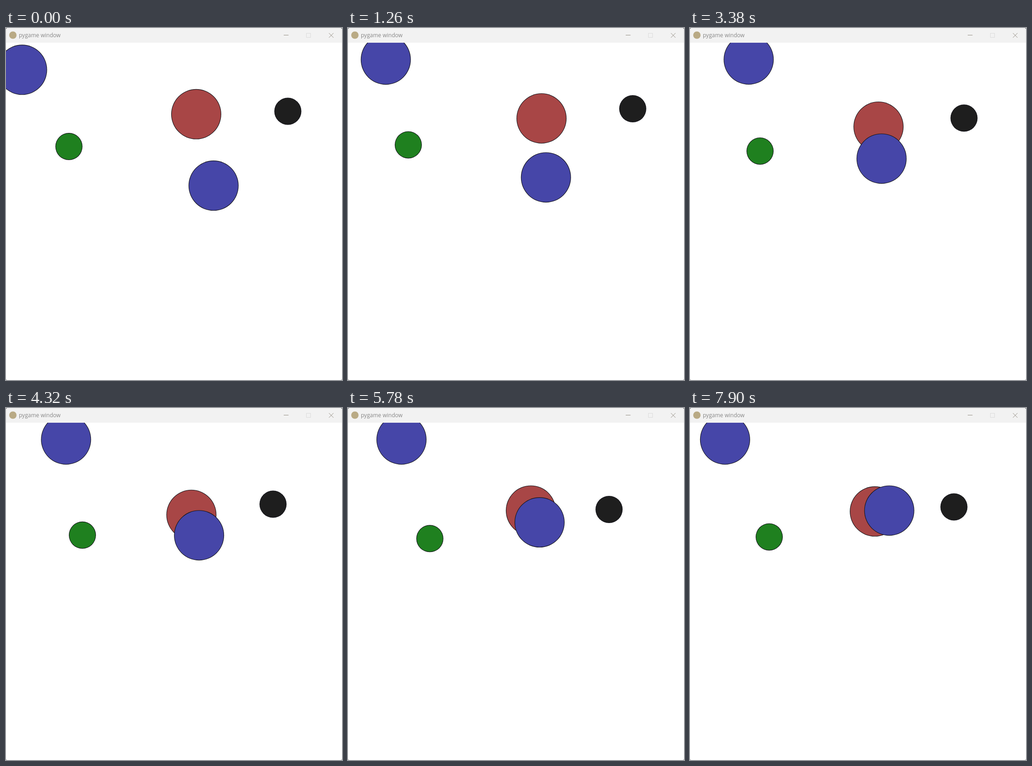
Recreate the animation shown at these times as an HTML page with a canvas. Size 732 by 765 pixels, loop 8000 ms.

```html
<!DOCTYPE html>
<html lang="en">
<head>
<meta charset="utf-8">
<title>pygame window</title>
<style>
  html, body { margin: 0; width: 100%; height: 100%; overflow: hidden; background: #fff; }
  canvas { display: block; }
</style>
</head>
<body>
<canvas id="stage" width="732" height="765"></canvas>
<script>
const ctx = document.getElementById('stage').getContext('2d');
const W = 732, H = 765, BAR = 32, LOOP = 8000;
const BIG = 54.5, SMALL = 29.5;
const BLUE = '#4646a8', RED = '#a84646', GREEN = '#1f801f', BLACK = '#1e1e1e';

// Key points are [seconds, value, ...]; a smooth curve runs through them.
const squeeze = curve([0, 0], [0.5, -11], [1.26, -6.3], [1.86, -9], [2.46, 0.9],
  [4.32, 32.5], [5.5, 44.5], [5.78, 45.2], [6.97, 39], [7.9, 39]);
const drift = curve([0, 35], [0.67, 54], [1.26, 82.4], [1.86, 92.5], [2.46, 106.5],
  [3.71, 133.5], [4.32, 130.8], [4.91, 135], [5.78, 116], [6.97, 83.4], [7.9, 76.2]);
const redPath = curve([0, 414.4, 187.3], [1.26, 421.6, 196.5], [2.46, 417.4, 195.6],
  [4.32, 403.8, 232.4], [5.78, 398.4, 222.8], [6.97, 401.7, 217.5], [7.9, 402.7, 225]);
const bluePath = curve([0, 452.2, 342.6], [1.26, 431.2, 324.6], [2.46, 415.4, 292.4],
  [4.32, 420.6, 276.5], [5.18, 413, 256.5], [5.78, 417.5, 248.2], [6.97, 422.7, 227.2],
  [7.9, 434.4, 222.8]);

function curve(...keys) {
  const slope = (i, axis) => {
    const a = keys[Math.max(0, i - 1)], b = keys[Math.min(keys.length - 1, i + 1)];
    return (b[axis] - a[axis]) / (b[0] - a[0]);
  };
  return t => {
    const i = Math.max(1, keys.findIndex(key => key[0] >= t));
    const a = keys[i - 1], b = keys[i], span = b[0] - a[0];
    const u = (t - a[0]) / span, ease = u * u * (3 - 2 * u);
    return a.slice(1).map((from, n) => {
      const axis = n + 1;
      return from + (b[axis] - from) * ease
        + span * u * (1 - u) * ((1 - u) * slope(i - 1, axis) - u * slope(i, axis));
    });
  };
}

// The window repaints about every 300 ms, snapped to a 15 Hz clock.
function lastRepaint(ms) {
  let shown = 0;
  for (let n = 0; n <= 26; n++) {
    const tick = 66.2 * Math.floor(4.53 * n + 1.71);
    if (tick <= ms) shown = tick;
  }
  return Math.min(shown / 1000, 7.9);
}

function ball(x, y, r, color) {
  for (const [radius, fill] of [[r, '#14141a'], [r - 1.1, color]]) {
    ctx.fillStyle = fill;
    ctx.beginPath();
    ctx.arc(x, y, radius, 0, 2 * Math.PI);
    ctx.fill();
  }
}

function drawBalls(t) {
  const [s] = squeeze(t);
  ball(drift(t)[0], 68.5 + 22.3 * Math.exp(-4 * t), BIG, BLUE);
  ball(...redPath(t), BIG, RED);
  ball(...bluePath(t), BIG, BLUE);
  // Both small balls share one swing.
  ball(137.1 + 0.91 * s, 257.6 + 0.58 * s, SMALL, GREEN);
  ball(614 - s, 181 + 0.87 * s, SMALL, BLACK);
}

function strokeLines(color, ...lines) {
  ctx.strokeStyle = color;
  ctx.lineWidth = 1;
  ctx.beginPath();
  for (const [x1, y1, x2, y2] of lines) {
    ctx.moveTo(x1, y1);
    ctx.lineTo(x2, y2);
  }
  ctx.stroke();
}

function drawTitleBar() {
  ctx.fillStyle = '#f2f2f2';
  ctx.fillRect(0, 0, W, BAR);
  ctx.fillStyle = '#b9aa85';
  ctx.beginPath();
  ctx.arc(15, 15.5, 8, 0, 2 * Math.PI);
  ctx.fill();
  ctx.fillStyle = '#878787';
  ctx.font = '12px "Open Sans", sans-serif';
  ctx.fillText('pygame window', 28, 20);
  strokeLines('#958f84', [605, 15.5, 615.5, 15.5],
    [703.5, 11, 713.5, 21], [713.5, 11, 703.5, 21]);
  ctx.strokeStyle = '#dcdcdc';
  ctx.strokeRect(654.5, 11.5, 9, 9);
}

function draw(ms) {
  ctx.fillStyle = '#555';
  ctx.fillRect(0, 0, W, H);
  ctx.save();
  ctx.beginPath();
  ctx.roundRect(0, 0, W, H, [4, 4, 2, 2]);
  ctx.clip();
  ctx.fillStyle = '#fff';
  ctx.fillRect(0, 0, W, H);
  drawBalls(lastRepaint(ms));
  drawTitleBar();
  ctx.restore();
}

const start = performance.now();
function loop() {
  draw((performance.now() - start) % LOOP);
  requestAnimationFrame(loop);
}
loop();
</script>
</body>
</html>
```
